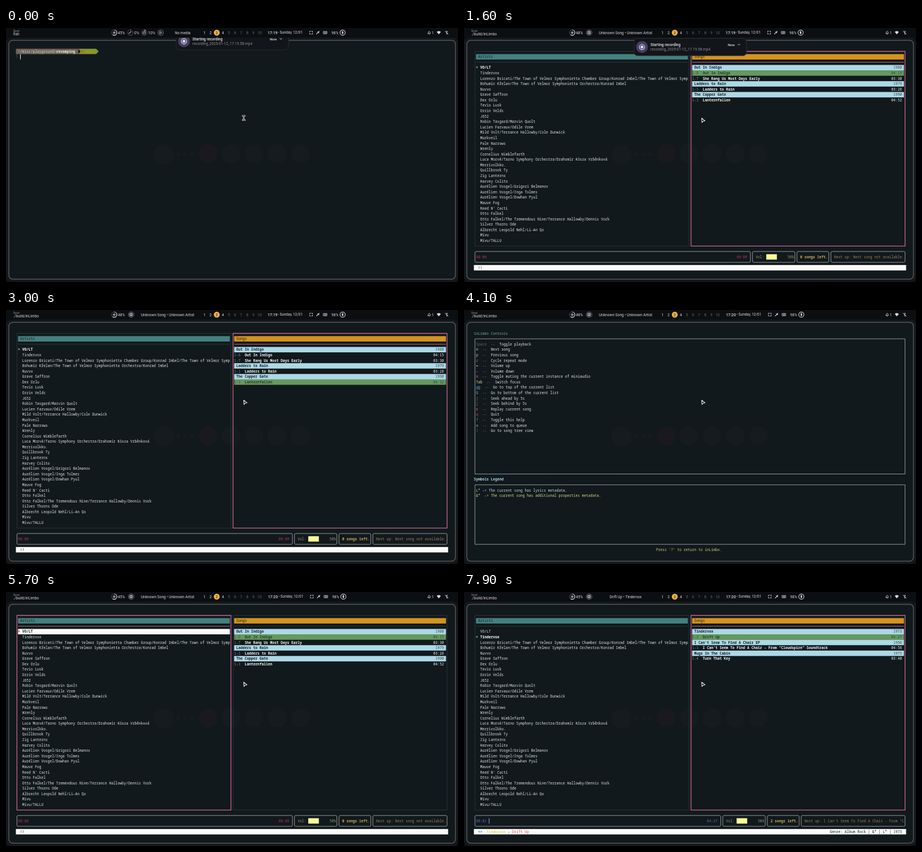
Recreate the animation shown at these times as an HTML page with a canvas. Size 800 by 450 pixels, loop 8 s.

```html
<!DOCTYPE html>
<html lang="en">
<head>
<meta charset="utf-8">
<title>inLimbo in a terminal</title>
<style>
html, body { margin: 0; width: 100%; height: 100%; overflow: hidden; background: #0c0f11; }
canvas { display: block; width: 800px; height: 450px; }
</style>
</head>
<body>
<canvas id="stage"></canvas>
<script>
const LOOP = 8000;
const MONO = '"Noto Sans Mono", "DejaVu Sans Mono", monospace';
const SANS = 'Roboto, "Noto Sans", sans-serif';
const INK = '#e4e6e4', DARK = '#152024', DIM = '#6c7376', PINK = '#c9648e', FAINT = '#2b3338', UI = '#dcd8e2';

const canvas = document.getElementById('stage');
const ctx = canvas.getContext('2d');
const ratio = window.devicePixelRatio || 1;
canvas.width = 800 * ratio;
canvas.height = 450 * ratio;

const artists = [
  'VO/LT', 'Tindervox',
  'Lorenzo Bricati/The Town of Velmor Symphonietta Chamber Group/Konrad Imbel/The Town of Velmor Symp',
  'Bohumír Křelan/The Town of Velmor Symphonietta Orchestra/Konrad Imbel',
  'Nuvvo', 'Grave Saffron', 'Dex Orlu', 'Tevio Lusk', 'Orrin Velds', 'J652',
  'Robin Tasgard/Marvin Quolt', 'Lucien Farvaux/Odile Vrem',
  'Mild Volt/Terrance Hallowby/Cole Dunwick', 'Murkveil', 'Pale Narrows', 'Wrenly',
  'Cornelius Wimblefarth', 'Luca Morvé/Tarno Symphony Orchestra/Drahomír Kósza Vrběnková',
  'Merrivolkko.', 'Quillbrook Ty', 'Zig Lanterns', 'Harvey Colito',
  'Aurélien Vosgel/Grigori Belmanov', 'Aurélien Vosgel/Inga Tolmes', 'Aurélien Vosgel/Dowhan Pyul',
  'Mauve Fog', "Reed N' Cacti", 'Otto Falkel',
  'Otto Falkel/The Tremendous Nine/Terrance Hallowby/Dennis Vork',
  'Silver Thorns Ode', 'Albrecht Leopold Nehl/Li-An Qo', 'Mivu', 'Mivu/TALLU'
];

// Entries with three parts are songs, entries with two are album headings.
const libraries = [
  [['Out In Indigo', '1980'], ['1-6', 'Out In Indigo', '04:15'], ['1-7', 'She Rang Us Most Days Early', '03:30'],
   ['Ladders to Rain', '1979'], ['1-1', 'Ladders to Rain', '03:28'],
   ['The Copper Gate', '1990'], ['1-1', 'Lanternfallen', '04:52']],
  [['Tindervox', '1973'], ['1-3', 'Drift Up', '04:27'],
   ["I Can't Seem To Find A Chair EP", '1998'],
   ['1-1', 'I Can\'t Seem To Find A Chair - From "Cloudspire" Soundtrack', '04:58'],
   ['Mugs In The Cabin', '1975'], ['1-4', 'Turn That Key', '03:40']]
];

const controls = [
  ['Space', 'Toggle playback', '#5d6669'], ['n', 'Next song', '#d5dde0'], ['p', 'Previous song', '#c5cde0'],
  ['r', 'Cycle repeat mode', '#d35c80'], ['=', 'Volume up', '#c8e0dc'], ['-', 'Volume down', '#d8d0a8'],
  ['m', 'Toggle muting the current instance of miniaudio', '#d0508c'], ['Tab', 'Switch focus', '#e2dc9c'],
  ['gg', 'Go to top of the current list', '#78aed0'], ['G', 'Go to bottom of the current list', '#7cc4dc'],
  [']', 'Seek ahead by 5s', '#b08448'], ['[', 'Seek behind by 5s', '#b87858'],
  ['r', 'Replay current song', '#c8a070'], ['q', 'Quit', '#cc4858'], ['?', 'Toggle this help', '#70c8a0'],
  ['a', 'Add song to queue', '#d89090'], ['1', 'Go to song tree view', '#5d6669']
];

const steps = [
  [0, { view: 'shell', command: '', title: 'fish', cpu: '45%', media: '', clock: '17:19', shift: 0,
        artist: 0, song: 1, focus: 'artists', playing: false, elapsed: '00:00' }],
  [400, { command: './build/inLimbo' }],
  [600, { view: 'main', title: './build/inLimbo' }],
  [1000, { media: 'Unknown Song • Unknown Artist', cpu: '48%' }],
  [1300, { focus: 'songs' }],
  [2500, { song: 2 }], [2700, { song: 4 }], [2900, { song: 6 }],
  [3200, { view: 'help' }],
  [3900, { clock: '17:20', shift: 1.3 }],
  [4700, { view: 'main' }],
  [4900, { song: 4 }], [5000, { cpu: '45%' }], [5100, { song: 2 }], [5300, { song: 1 }],
  [5500, { focus: 'artists' }],
  [5900, { artist: 1 }],
  [6200, { focus: 'songs' }],
  [6400, { playing: true, media: 'Drift Up • Tindervox' }],
  [7500, { elapsed: '00:01' }]
];
const stateAt = t => Object.assign({}, ...steps.filter(([at]) => at <= t).map(([, change]) => change));

// Terminal grid
const CELL = 3.75, LINE = 9.58;
const colX = c => 17.5 + c * CELL;
const rowY = r => 41.5 + r * LINE;

// Fonts are set large and scaled down so that advances stay fractional.
function text(str, x, y, color, size = 6.5, weight = 400, family = SANS, align = 'left') {
  ctx.save();
  ctx.translate(x, y + size * 0.35);
  ctx.scale(0.1, 0.1);
  ctx.font = `${weight} ${size * 10}px ${family}`;
  ctx.textAlign = align;
  ctx.fillStyle = color;
  ctx.fillText(str, 0, 0);
  ctx.restore();
}
const put = (str, col, row, color = INK, weight = 400) => text(str, colX(col), rowY(row), color, 6.25, weight, MONO);
const putRight = (str, col, row, color, weight) => put(str, col - str.length, row, color, weight);

function band(c0, c1, row, color) {
  ctx.fillStyle = color;
  ctx.fillRect(colX(c0), rowY(row) - LINE / 2, (c1 - c0) * CELL, LINE);
}
function rounded(x, y, w, h, r, fill, stroke, width = 1) {
  ctx.beginPath();
  ctx.roundRect(x, y, w, h, r);
  if (fill) { ctx.fillStyle = fill; ctx.fill(); }
  if (stroke) { ctx.strokeStyle = stroke; ctx.lineWidth = width; ctx.stroke(); }
}
function frame(c0, r0, c1, r1, color, width = 0.9, radius = 2) {
  const x = colX(c0 + 0.5), y = rowY(r0);
  rounded(x, y, colX(c1 + 0.5) - x, rowY(r1) - y, radius, null, color, width);
}
function disc(x, y, r, fill, stroke, width = 1) {
  ctx.beginPath();
  ctx.arc(x, y, r, 0, Math.PI * 2);
  if (fill) { ctx.fillStyle = fill; ctx.fill(); }
  if (stroke) { ctx.strokeStyle = stroke; ctx.lineWidth = width; ctx.stroke(); }
}
function path(d, x, y, fill, stroke, width = 1) {
  const shape = new Path2D(d);
  ctx.save();
  ctx.translate(x, y);
  ctx.lineJoin = ctx.lineCap = 'round';
  if (fill) { ctx.fillStyle = fill; ctx.fill(shape); }
  if (stroke) { ctx.strokeStyle = stroke; ctx.lineWidth = width; ctx.stroke(shape); }
  ctx.restore();
}

function drawDesktop() {
  ctx.fillStyle = '#0c0f11';
  ctx.fillRect(0, 0, 800, 450);
  rounded(0, 17, 800, 433, 9, '#15181b');
  rounded(5, 21.7, 790.5, 423.3, 7, '#11191c', '#55565a', 1.5);
  disc(279, 224, 18, '#151b1f');
  [305, 317, 329].forEach(x => disc(x, 224, 3, '#171c20'));
  [358, 398, 439, 480, 521].forEach((x, i) => disc(x, 223, 17, i ? '#151b1f' : '#1a191d'));
}

function gauge(x, share) {
  disc(x, 8.2, 4.7, null, '#4a4754', 1.2);
  ctx.beginPath();
  ctx.arc(x, 8.2, 4.7, -Math.PI / 2, Math.PI * (2 * share - 0.5));
  ctx.strokeStyle = UI;
  ctx.stroke();
}

function drawBar(s) {
  text('foot', 13, 4.9, '#9a999e', 6);
  text(s.title, 13, 10.8, UI, 6.6);
  gauge(191.5, 0.6);
  disc(191.5, 8.2, 2.2, '#8f8b9a');
  text(s.cpu, 198, 8.4, UI, 6.7);
  if (s.media) {
    disc(221.5, 8.2, 5, '#2b2931', '#777380', 0.8);
    path('M-2 -2H2V2H-2ZM0 -2V2', 221.5, 8.2, null, UI, 0.9);
    text(s.media, 286, 8.4, UI, 6.6, 400, SANS, 'center');
  } else {
    gauge(220, 0.02);
    path('M-2 1.5L1.5 -1.5M-2 1.5V0M1.5 -1.5H0', 220, 8.2, null, UI, 0.8);
    text('0%', 227, 8.4, UI, 6.7);
    gauge(244.7, 0.1);
    path('M-2 -1H2V2H-2ZM-1 -2H2', 244.7, 8.2, null, UI, 0.8);
    text('10%', 251.5, 8.4, UI, 6.7);
    disc(273.7, 8.2, 5, '#24222a', '#777380', 0.8);
    path('M-1.2 -2L2 0L-1.2 2Z', 273.7, 8.2, null, UI, 0.7);
    text('No media', 299, 8.4, UI, 6.4);
  }
  disc(373, 8.2, 5.2, '#eeb04a');
  for (let n = 1; n <= 10; n++) {
    const color = n === 3 ? '#2a2010' : n < 5 ? UI : '#66656b';
    text(n, 340.5 + n * 10.82, 8.4, color, 6.7, 400, SANS, 'center');
  }
  const dx = s.shift;
  text(s.clock, 463 + dx / 2, 8.2, UI, 6.9, 500);
  text('•', 481 + dx, 8.2, UI, 6);
  text('Sunday, 12/01', 484.5 + dx, 8.2, UI, 6.4);
  path('M-2.5 -1V-2.5H-1M1 -2.5H2.5V-1M2.5 1V2.5H1M-1 2.5H-2.5V1', 540 + dx, 8.2, null, UI, 0.9);
  path('M-2.5 2.5L1 -1M-0.2 -1.6L1.7 0.3M1 -1L2.2 -2.2', 552 + dx, 8.2, null, UI, 1.2);
  path('M-3 -2H3V2H-3ZM-1.7 -0.6H1.8M-1.5 1H1.5', 565 + dx, 8.2, null, UI, 0.8);
  text('98%', 576 + dx, 8.4, UI, 6.6);
  disc(595.8 + dx, 8.2, 4.6, null, UI, 1.1);
  rounded(594.6 + dx, 5.8, 2.4, 4.8, 0.7, UI);
  path('M-2.3 1.8H2.3L1.6 0.9V-1Q0 -3.6 -1.6 -1V0.9ZM-0.5 2.8H0.5', 749, 8, null, UI, 0.8);
  text('1', 753.3, 8.4, UI, 6.5);
  path('M-3.6 -1.2Q0 -4 3.6 -1.2L0 3Z', 766, 8.2, UI);
  path('M-1.8 -1.6L1.8 1.6L0 3V-3L1.8 -1.6M-2.8 -2.8L2.8 2.8', 780, 8.2, null, UI, 0.8);
}

function drawShell(s) {
  band(0, 29.5, 0, '#6d6257');
  put('~/misc/playground/', 1, 0, '#d8d0c0');
  put('revamping', 19, 0, '#f0ead8', 700);
  path('M0 -4.8H31.5L36 0L31.5 4.8H0L4 0Z', 128, rowY(0), '#7e962f');
  path('M-1.5 -3V3M-1.5 1Q1.5 1 1.5 -2', 136, rowY(0), null, '#d0542c', 0.9);
  put('main', 33, 0, '#d98a2e');
  put('$', 0, 1, '#4a4038');
  put(s.command, 2, 1);
  ctx.fillStyle = '#f2f2f2';
  ctx.fillRect(colX(2 + s.command.length), rowY(1) - 4.6, 1, 9.2);
}

function drawPanel(c0, c1, title, color, focused) {
  const edge = focused ? PINK : FAINT;
  frame(c0, 0, c1, 36, edge, focused ? 1.3 : 1, 0);
  band(c0 + 1, c1, 1, color);
  put(title, c0 + 2, 1, DARK, 500);
  ctx.fillStyle = edge;
  ctx.fillRect(colX(c0 + 1), rowY(2) - 0.5, (c1 - c0 - 1) * CELL, 1);
}

function drawMain(s, t) {
  const onArtists = s.focus === 'artists';
  drawPanel(0, 101, 'Artists', '#44807f', onArtists);
  drawPanel(102, 203, 'Songs', '#d4941e', !onArtists);

  artists.forEach((name, i) => {
    const row = i + 3, current = i === s.artist, lit = current && onArtists;
    if (lit) band(1, 101, row, '#fafafa');
    if (current) put('>', 1, row, lit ? DARK : INK, 700);
    put(name, 3, row, lit ? DARK : current ? '#ffffff' : INK, current ? 700 : 400);
  });

  libraries[s.artist].forEach((entry, i) => {
    const row = i + 3;
    if (entry.length === 2) {
      band(103, 203, row, '#add8e6');
      put(entry[0], 104, row, DARK, 700);
      putRight(entry[1], 202, row, '#30454d');
      return;
    }
    const [track, name, length] = entry, lit = i === s.song;
    if (lit) band(103, 203, row, '#66995f');
    put(track, 103, row, lit ? '#3a5040' : '#868c8c');
    put(name, 108, row, lit ? '#243c2c' : '#f4f4f4', 700);
    putRight(length, 202, row, lit ? '#2f4a34' : '#f0f0f0', 500);
  });
  drawPlayer(s, t);
}

function drawPlayer(s, t) {
  const off = s.playing ? 14 : 0, edge = '#a5a9a8';
  const timeColor = s.playing ? '#6468b4' : '#a83058';
  [[0, 130 - off], [131 - off, 151 - off], [152 - off, 167 - off], [168 - off, 203]]
    .forEach(([c0, c1]) => frame(c0, 37, c1, 39, edge));
  put(s.elapsed, 1, 38, timeColor);
  putRight(s.playing ? '04:27' : '00:00', 129 - off, 38, timeColor);
  if (s.playing) {
    const eighths = Math.max(0, Math.floor((t - 6680) / 310));
    band(7, 7 + eighths / 8, 38, '#7478c4');
  }
  put('Vol:', 133 - off, 38, '#93986c');
  band(138 - off, 143 - off, 38, '#fbfb9a');
  put('50%', 148 - off, 38, '#93986c');
  put(s.playing ? '2 songs left.' : '0 songs left.', 154 - off, 38, '#cfa85c', 700);
  const next = s.playing ? 'I Can\'t Seem To Find A Chair - From "C' : 'Next song not available.';
  put('Next up: ' + next, 170 - off, 38, '#9a8258');

  band(0, 204, 40, '#fafaf8');
  put(s.playing ? '<>' : '!!', 2, 40, DARK);
  if (s.playing) {
    put('Tindervox', 6, 40, '#ecc02c', 500);
    put('-', 16, 40, DARK);
    put('Drift Up', 18, 40, '#dc4c44', 500);
    putRight('Genre: Album Rock | &* | L* | 1973', 202, 40, DARK);
  }
}

function drawHelp() {
  const edge = '#a5a9a8';
  put('inLimbo Controls', 0, 0, '#587474', 700);
  frame(0, 1, 203, 26, edge, 0.9, 0);
  controls.forEach(([key, label, color], i) => {
    const row = i + 2, col = 1 + key.length;
    put(key, 1, row, color);
    put('--', col + 2, row, DIM);
    put(label, col + 6, row);
  });
  put('Symbols Legend', 0, 27, '#b0d4e0', 700);
  frame(0, 28, 203, 39, edge, 0.9, 0);
  put('L* -> The current song has lyrics metadata.', 1, 29, '#c4dce0');
  put('&*  -> The current song has additional properties metadata.', 1, 30, '#dcd884');
  put("Press '?' to return to inLimbo.", 86, 40, '#d0cf80');
}

function noticeOffset(t) {
  if (t < 400) return -10.5 * Math.pow(1 - t / 400, 8);
  if (t < 2000) return 0;
  return -34 * Math.min(1, (t - 2000) / 400) ** 2;
}

function drawNotice(t) {
  if (t >= 2400) return;
  ctx.save();
  ctx.beginPath();
  ctx.rect(290, 17, 220, 40);
  ctx.clip();
  ctx.translate(0, noticeOffset(t));
  rounded(301, 18.5, 199, 30.5, 6, '#121519', '#292c31', 1);
  disc(315, 33.7, 10.5, '#453f62');
  disc(315, 33.7, 4.7, null, '#ddd6f4', 1.2);
  disc(315, 33.7, 2.6, '#ddd6f4');
  text('Starting recording', 330, 30, '#e8e6ec', 6.6, 500);
  text('recording_2025-01-12_17.19.58.mp4', 330, 38, '#8e8d93', 6.5);
  text('Now', 467, 29.8, '#e8e6ec', 6, 500);
  path('M-1.7 -0.8L0 0.9L1.7 -0.8', 486.5, 29.5, null, '#e8e6ec', 1);
  ctx.restore();
}

function drawPointer(s) {
  if (s.view === 'shell') {
    const beam = 'M-2 -3.7H2M0 -3.7V3.7M-2 3.7H2';
    path(beam, 420.8, 159.3, null, '#f2f2f2', 2.4);
    path(beam, 420.8, 159.3, null, '#15191b', 0.9);
  } else {
    path('M0 0L5.8 4.7L2.6 5.3L0.6 7.8Z', 420.7, 159.7, '#101416', '#f2f2f2', 1.1);
  }
}

const views = { shell: drawShell, main: drawMain, help: drawHelp };

function render(t) {
  const s = stateAt(t);
  ctx.setTransform(ratio, 0, 0, ratio, 0, 0);
  drawDesktop();
  drawBar(s);
  views[s.view](s, t);
  drawNotice(t);
  drawPointer(s);
}

const start = performance.now();
function tick() {
  render((performance.now() - start) % LOOP);
  requestAnimationFrame(tick);
}
tick();
</script>
</body>
</html>
```
